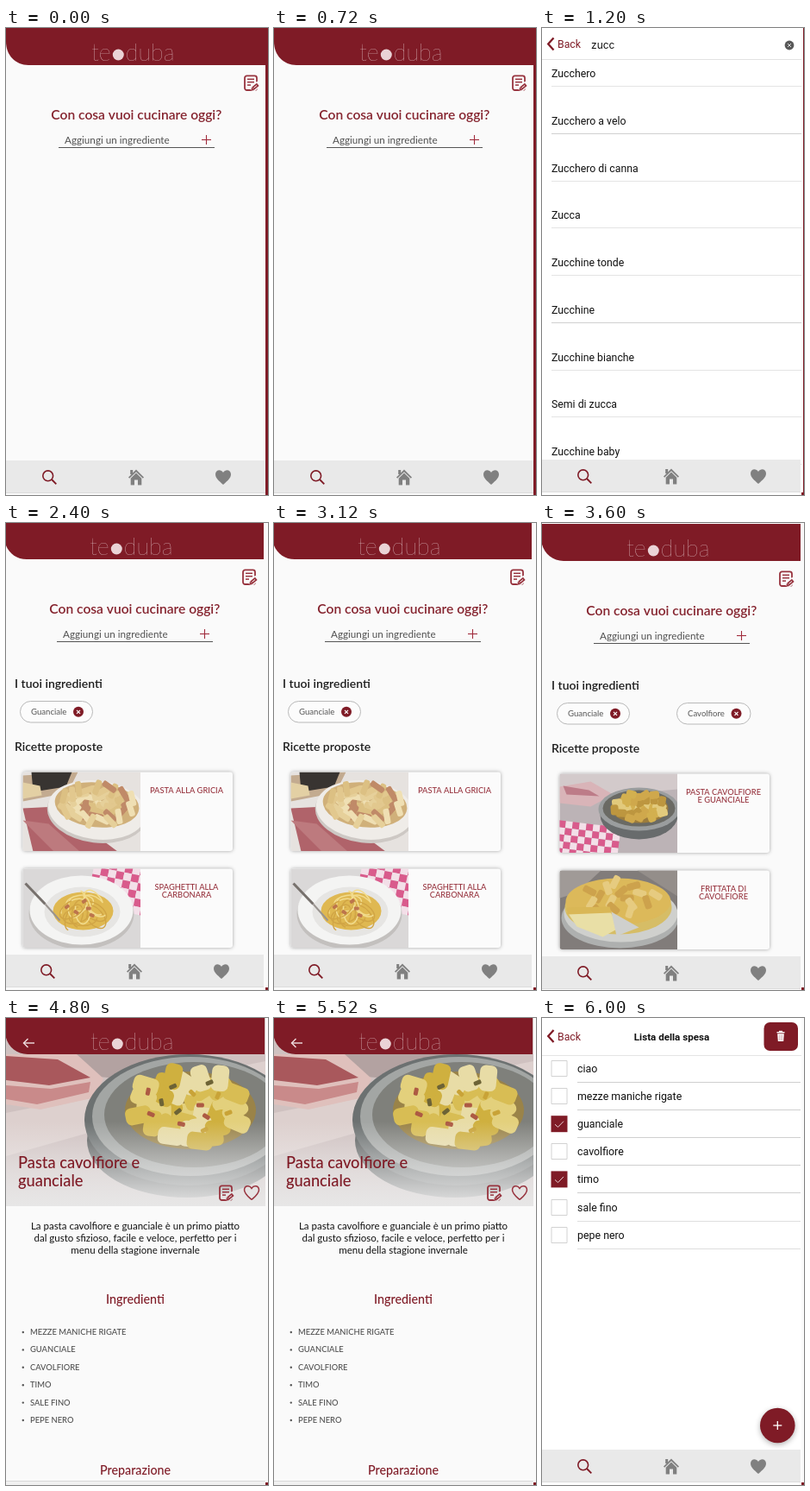
An HTML page with a canvas that plays this animation: 304x541 px, repeating every 7.2 s.

```html
<!DOCTYPE html>
<html lang="it">
<head>
<meta charset="utf-8">
<title>Ricettario</title>
<style>
html, body { margin: 0; width: 100%; height: 100%; overflow: hidden; background: #fafafa; }
canvas { display: block; width: 304px; height: 541px; }
</style>
</head>
<body>
<canvas id="stage"></canvas>
<script>
const W = 304, H = 541, HOLD = 1200;
const RED = '#7f1b26', SOFT_RED = '#98343f', PAGE = '#fafafa', GREY = '#808080', INK = '#1c1c1c';
const LATO = 'Lato, sans-serif', ROBOTO = 'Roboto, sans-serif';
const canvas = document.getElementById('stage');
const c = canvas.getContext('2d');
const scale = window.devicePixelRatio || 1;
canvas.width = Math.round(W * scale);
canvas.height = Math.round(H * scale);

function box(x, y, w, h, color) {
  c.fillStyle = color;
  c.fillRect(x, y, w, h);
}

function shape(color, build) {
  c.beginPath();
  build();
  c.fillStyle = color;
  c.fill();
}

function outline(color, width, build) {
  c.beginPath();
  build();
  c.strokeStyle = color;
  c.lineWidth = width;
  c.stroke();
}

function trace(...p) {
  c.moveTo(p[0], p[1]);
  for (let i = 2; i < p.length; i += 2) c.lineTo(p[i], p[i + 1]);
}

const line = (color, width, ...p) => outline(color, width, () => trace(...p));
const poly = (color, ...p) => shape(color, () => trace(...p));
const disc = (x, y, r, color) => shape(color, () => c.arc(x, y, r, 0, 7));
const oval = (x, y, rx, ry, color, turn = 0) =>
  shape(color, () => c.ellipse(x, y, rx, ry, turn, 0, 7));

function text(s, x, y, size, color, { face = LATO, weight = 400, align = 'left' } = {}) {
  c.font = `${weight} ${size}px ${face}`;
  c.fillStyle = color;
  c.textAlign = align;
  c.fillText(s, x, y);
}

function at(x, y, draw) {
  c.save();
  c.translate(x, y);
  draw();
  c.restore();
}

function cross(x, y, r, color, width) {
  line(color, width, x - r, y - r, x + r, y + r);
  line(color, width, x - r, y + r, x + r, y - r);
}

function plus(x, y, r, color, width) {
  line(color, width, x - r, y, x + r, y);
  line(color, width, x, y - r, x, y + r);
}

function heartPath(x, y, s = 1) {
  const curve = (...p) => c.bezierCurveTo(...p.map((v, i) => (i % 2 ? y : x) + v * s));
  c.moveTo(x, y + 8.5 * s);
  curve(-5, 4, -9, 1, -9, -3.5);
  curve(-9, -9, -2.5, -10, 0, -5.5);
  curve(2.5, -10, 9, -9, 9, -3.5);
  curve(9, 1, 5, 4, 0, 8.5);
}

function noteIcon(x, y, back) {
  at(x, y, () => {
    outline(SOFT_RED, 1.8, () => c.roundRect(1, 0.9, 14, 16.6, 2.5));
    [4.8, 8.2, 11.6].forEach((v, i) => line(SOFT_RED, 1.5, 4, v, i < 2 ? 12 : 8, v));
    line(back, 6.5, 9, 18, 17.5, 9.5);
    line(SOFT_RED, 4.2, 10.6, 15.6, 16.3, 10.9);
    poly(SOFT_RED, 8.3, 18.2, 8.9, 14.2, 12.4, 17.4);
    line(back, 1, 11.5, 14.8, 15, 12);
  });
}

function homeIcon(x, y) {
  poly(GREY, x - 9, y, x, y - 9, x + 9, y, x + 7.8, y + 1.3, x, y - 6.3, x - 7.8, y + 1.3);
  box(x - 6.8, y - 8.5, 3, 5, GREY);
  poly(GREY, x - 6.3, y + 1.3, x, y - 4.9, x + 6.3, y + 1.3, x + 6.3, y + 9,
    x + 2, y + 9, x + 2, y + 3, x - 2, y + 3, x - 2, y + 9, x - 6.3, y + 9);
}

function navBar(dx, dy) {
  at(dx, dy, () => {
    box(0, 501, 301, 37, '#e9e9e9');
    box(0, 538, 301, 1, '#dcdcdc');
    box(dx, 501, -dx, 37, '#e9e9e9');
    outline(RED, 1.6, () => c.arc(48.7, 518.8, 5.9, 0, 7));
    line(RED, 1.9, 53, 523, 58.3, 528.3);
    homeIcon(151, 520.5);
    shape(GREY, () => heartPath(252, 520.5));
  });
}

function edge(full) {
  if (full) return box(301, 0, 3, H, RED);
  box(301, 0, 3, H, '#fafafa');
  box(301, 538, 3, 3, RED);
}

function wordmark(x, y) {
  const tint = '#f6e9eb', style = { weight: 100 };
  text('te', x, y, 27, tint, style);
  const mid = x + c.measureText('te').width + 8.5;
  disc(mid, y - 7, 6.5, '#ead3d6');
  text('duba', mid + 8.5, y, 27, tint, style);
}

function header(dx, dy) {
  at(dx, dy, () => {
    shape(RED, () => {
      c.moveTo(0, Math.max(-dy, 0));
      c.lineTo(301, Math.max(-dy, 0));
      c.lineTo(301, 43);
      c.lineTo(26, 43);
      c.bezierCurveTo(11, 43, 0, 31.5, 0, 16);
    });
    wordmark(99, 38);
  });
}

// Seeded scatter of short tubes inside an ellipse
function pasta(x, y, rx, ry, count, len, thick, seed, colors) {
  const rnd = () => (seed = (seed * 16807) % 2147483647) / 2147483647;
  for (let i = 0; i < count; i++) {
    const a = i * 2.4, d = Math.sqrt((i + 0.5) / count);
    at(x + Math.cos(a) * rx * d, y + Math.sin(a) * ry * d, () => {
      c.rotate(rnd() * Math.PI);
      shape(colors[i % colors.length], () => c.roundRect(-len / 2, -thick / 2, len, thick, thick / 3));
    });
  }
}

function checks(x, y, cols, rows, size) {
  for (let i = 0; i < cols * rows; i++) {
    const u = i % cols, v = Math.floor(i / cols);
    box(x + u * size, y + v * size, size, size, (u + v) % 2 ? '#f3dfe8' : '#d95b8c');
  }
}

// Card pictures, drawn in a 137 by 92 area
const pictures = {
  gricia() {
    box(0, 0, 137, 92, '#e6e2df');
    poly('#c3ab90', 0, 4, 64, 0, 52, 24, 0, 34);
    poly('#383431', 10, 0, 57, 0, 50, 17, 12, 23);
    poly('#e3d0a4', 0, 12, 20, 16, 22, 27, 0, 31);
    poly('#b0636a', 0, 42, 40, 40, 110, 92, 12, 92);
    poly('#bd7a7e', 0, 56, 30, 60, 66, 92, 36, 92);
    oval(86, 47, 58, 35, '#cdc8c4', 0.12);
    oval(86, 44, 57, 34, '#efece8', 0.12);
    oval(86, 38, 49, 26, '#d0b07a', 0.1);
    pasta(86, 37, 43, 22, 48, 18, 7, 31, ['#e6d09a', '#dcc083', '#efdfb3', '#e2c88e', '#c08a68']);
  },
  carbonara() {
    box(0, 0, 137, 92, '#dad8d8');
    at(82, 0, () => { c.rotate(0.2); checks(0, -12, 8, 6, 9); });
    oval(68, 52, 61, 41, '#c3c0be');
    oval(68, 48, 60, 40, '#f4f4f3');
    oval(69, 50, 44, 29, '#e6e5e3');
    oval(70, 49, 35, 22, '#dfb851');
    for (let i = 0; i < 13; i++) {
      outline(i % 2 ? '#f2dc8e' : '#d1a545', 1.5, () =>
        c.ellipse(70 + Math.sin(i * 2) * 14, 48 + Math.cos(i * 3) * 9, 16, 9, i, 0, 5));
    }
    pasta(70, 46, 20, 12, 5, 6, 4, 9, ['#bd754c']);
    line('#77716d', 3, 3, 17, 26, 41);
    line('#9a9490', 2, 26, 41, 43, 60);
  },
  cauliflower() {
    box(0, 0, 137, 92, '#bcb3b6');
    poly('#d3cacb', 0, 0, 137, 0, 137, 18, 0, 30);
    poly('#d9b4b8', 0, 15, 36, 9, 62, 24, 36, 38, 0, 34);
    poly('#bd7c88', 4, 14, 34, 19, 46, 26, 8, 24);
    at(0, 66, () => { c.rotate(0.12); checks(-2, -12, 9, 6, 8); });
    oval(92, 48, 45, 28, '#686b6c');
    oval(92, 41, 47, 25, '#9a9d9e');
    oval(92, 40, 42, 21, '#6a6a64');
    oval(93, 40, 33, 17, '#9c7c3c');
    pasta(93, 38, 31, 16, 32, 12, 9, 17, ['#d3b04f', '#e2ca7c', '#bd963f', '#cfa84c']);
  },
  omelette() {
    box(0, 0, 137, 92, '#817c7a');
    poly('#a09a97', 0, 0, 48, 0, 20, 26, 0, 32);
    poly('#948e8a', 90, 0, 137, 0, 137, 30);
    oval(70, 55, 68, 35, '#aeb0af');
    oval(71, 50, 66, 33, '#cfd0cd');
    oval(68, 43, 62, 31, '#d6bd66');
    oval(68, 36, 61, 27, '#dcb95a');
    pasta(70, 32, 46, 19, 16, 16, 8, 5, ['#cda24c', '#e6cb80']);
    poly('#e9dfa6', 8, 47, 58, 47, 70, 66, 50, 77, 20, 65);
    poly('#d9b756', 8, 43, 58, 42, 60, 49, 9, 51);
    poly('#cfd0cd', 60, 48, 92, 66, 66, 76);
  }
};

function card(y, picture, lines) {
  c.save();
  c.shadowColor = 'rgba(0,0,0,.35)';
  c.shadowBlur = 4 * scale;
  shape('#fbfbfb', () => c.roundRect(21.5, y, 243.5, 91.5, 3));
  c.restore();
  c.save();
  c.beginPath();
  c.roundRect(21.5, y, 136.5, 91.5, [3, 0, 0, 3]);
  c.clip();
  c.translate(21.5, y);
  pictures[picture]();
  c.restore();
  lines.forEach((s, i) =>
    text(s, 211.5, y + 24.5 + i * 9, 9.3, SOFT_RED, { weight: 500, align: 'center' }));
}

function chip(x, w, label) {
  shape('#fcfcfc', () => c.roundRect(x, 207.5, w, 24.5, 12.2));
  outline('#b9b9b9', 1, () => c.roundRect(x, 207.5, w, 24.5, 12.2));
  text(label, x + 12.5, 223, 9.6, '#555');
  disc(x + w - 16.5, 219.8, 6, RED);
  cross(x + w - 16.5, 219.8, 2, '#fff', 1.2);
}

function searchPage(dx, dy, chips, cards) {
  box(0, 0, W, H, PAGE);
  header(dx, dy);
  at(dx, dy, () => {
    noteIcon(276, 54.5, PAGE);
    text('Con cosa vuoi cucinare oggi?', 151.3, 106, 15.6, '#85232e', { weight: 600, align: 'center' });
    text('Aggiungi un ingrediente', 68, 133.5, 11.7, '#505050');
    plus(232.5, 129.5, 5.5, '#a02c3c', 1.1);
    line('#555', 1, 61, 138.5, 242, 138.5);
    if (!chips) return;
    text('I tuoi ingredienti', 12, 192, 14, INK, { weight: 600 });
    text('Ricette proposte', 12, 265, 14, INK, { weight: 600 });
    chips.forEach(([x, w, label]) => chip(x, w, label));
    cards.forEach(([picture, ...lines], i) => card(289.5 + i * 112, picture, lines));
  });
  navBar(dx, dy);
  edge(!chips);
}

function backLink(y) {
  line(RED, 2.3, 13.5, y - 7, 7.2, y, 13.5, y + 7);
  text('Back', 18, y + 4.5, 12.3, RED, { face: ROBOTO });
}

function resultsPage() {
  box(0, 0, W, H, '#fff');
  backLink(18.5);
  text('zucc', 57, 24, 12, '#111', { face: 'Inter, sans-serif' });
  disc(287, 20, 5.4, '#595959');
  cross(287, 20, 2, '#ddd', 1);
  box(0, 36, 301, 1, '#e2e2e2');
  ['Zucchero', 'Zucchero a velo', 'Zucchero di canna', 'Zucca', 'Zucchine tonde', 'Zucchine',
    'Zucchine bianche', 'Semi di zucca', 'Zucchine baby'].forEach((s, i) => {
    text(s, 11, 57 + i * 54.75, 12.3, '#111', { face: ROBOTO });
    box(11, Math.floor(67.5 + i * 54.75), 290, 1, i % 4 === 1 ? '#d0d0d0' : '#e4e4e4');
  });
  navBar(-1, -1);
  edge(false);
  box(303, 0, 1, H, RED);
}

function heroPicture() {
  c.save();
  c.beginPath();
  c.rect(0, 0, 301, 218);
  c.clip();
  box(0, 0, 301, 218, '#cfc1c0');
  poly('#ddd0ce', 0, 110, 301, 50, 301, 75, 0, 160);
  poly('#b3a2a1', 70, 42, 200, 42, 130, 70, 84, 66);
  poly('#dfc0bc', 0, 42, 82, 42, 113, 70, 104, 92, 40, 106, 0, 100);
  poly('#a9585c', 0, 44, 60, 48, 98, 69, 50, 78, 0, 72);
  poly('#c98a8a', 0, 78, 52, 82, 98, 74, 96, 86, 36, 100, 0, 94);
  oval(210, 142, 116, 66, '#565a5a');
  oval(212, 118, 121, 76, '#6c7171');
  oval(214, 114, 114, 69, '#a3a6a4');
  oval(218, 112, 104, 61, '#7f807b');
  oval(214, 107, 76, 45, '#9a8348');
  pasta(214, 103, 66, 41, 34, 30, 20, 23, ['#cfb03f', '#e3d07c', '#d8bd54', '#e8dca6']);
  pasta(214, 101, 58, 32, 13, 9, 5, 44, ['#ad5a43', '#6d6336', '#c9a337']);
  const fade = c.createLinearGradient(0, 120, 0, 218);
  fade.addColorStop(0, 'rgba(240,240,240,0)');
  fade.addColorStop(0.5, 'rgba(240,240,240,.5)');
  fade.addColorStop(1, 'rgba(232,232,232,.96)');
  box(0, 120, 301, 98, fade);
  c.restore();
}

function recipePage() {
  const mid = { align: 'center' }, head = { align: 'center', weight: 500 };
  box(0, 0, W, H, PAGE);
  heroPicture();
  header(-1, -1);
  line('#f0dfe1', 1.4, 33, 29, 20.5, 29);
  line('#f0dfe1', 1.4, 25.5, 24, 20.5, 29, 25.5, 34);
  text('Pasta cavolfiore e', 14, 173.5, 18.3, RED, { weight: 500 });
  text('guanciale', 14, 194.5, 18.3, RED, { weight: 500 });
  noteIcon(247, 193.5, '#e6e6e6');
  outline(SOFT_RED, 1.5, () => heartPath(285, 202.5, 0.94));
  ['La pasta cavolfiore e guanciale è un primo piatto',
    'dal gusto sfizioso, facile e veloce, perfetto per i',
    'menu della stagione invernale'].forEach((s, i) => text(s, 150, 245 + i * 14, 11.5, '#111', mid));
  text('Ingredienti', 150, 330.5, 14.3, RED, head);
  ['MEZZE MANICHE RIGATE', 'GUANCIALE', 'CAVOLFIORE', 'TIMO', 'SALE FINO', 'PEPE NERO'].forEach((s, i) => {
    const y = 367 + i * 20.4;
    disc(19.8, y - 3, 1.2, '#555');
    text(s, 28, y, 9.4, '#505050', { weight: 500 });
  });
  text('Preparazione', 150, 528.5, 14.3, RED, head);
  box(0, 536, 301, 1, '#d8d8d8');
  box(0, 537, 301, 4, '#f1f1f1');
  edge(false);
}

function listPage() {
  box(0, 0, W, H, '#fff');
  backLink(21);
  text('Lista della spesa', 150.5, 25.5, 11.6, '#111', { face: ROBOTO, weight: 700, align: 'center' });
  shape(RED, () => c.roundRect(257.5, 5, 39.5, 33, 7));
  box(272.5, 16, 9, 1.4, '#fff');
  box(275, 14.8, 4, 1.4, '#fff');
  poly('#fff', 273.2, 18.2, 280.8, 18.2, 280.2, 27, 273.8, 27);
  [275.4, 277, 278.6].forEach(x => line('#b9777e', 0.5, x, 19.5, x, 26));
  box(0, 43, 301, 1, '#e4e4e4');
  ['ciao', 'mezze maniche rigate', 'guanciale', 'cavolfiore', 'timo', 'sale fino', 'pepe nero'].forEach((s, i) => {
    const y = 49 + i * 32.1, done = i === 2 || i === 4;
    shape(done ? RED : '#fff', () => c.rect(10.5, y, 19, 19));
    if (done) line('#e6cdd0', 1, 15, y + 10, 18.5, y + 13.2, 25, y + 6.5);
    else outline('#d2d2d2', 1, () => c.rect(11, Math.round(y) + 0.5, 18, 18));
    text(s, 41, y + 14, 12.4, '#111', { face: ROBOTO });
    box(41, Math.round(y + 25), 259, 1, i < 5 ? '#cfcfcf' : '#dedede');
  });
  c.save();
  c.shadowColor = 'rgba(0,0,0,.3)';
  c.shadowBlur = 6 * scale;
  c.shadowOffsetY = 2 * scale;
  disc(273.3, 472, 20.3, RED);
  c.restore();
  plus(273.3, 472, 5, '#fff', 1.3);
  navBar(-1, -1);
  edge(false);
}

const guanciale = [18.5, 84, 'Guanciale'];
const cavolfiore = [157.5, 85.5, 'Cavolfiore'];
const screens = [
  () => searchPage(0, 0),
  resultsPage,
  () => searchPage(-2, -1, [guanciale], [
    ['gricia', 'PASTA ALLA GRICIA'],
    ['carbonara', 'SPAGHETTI ALLA', 'CARBONARA']
  ]),
  () => searchPage(-1, 1, [guanciale, cavolfiore], [
    ['cauliflower', 'PASTA CAVOLFIORE', 'E GUANCIALE'],
    ['omelette', 'FRITTATA DI', 'CAVOLFIORE']
  ]),
  recipePage,
  listPage
];

const start = performance.now();
function tick() {
  const t = Math.max(0, performance.now() - start);
  c.setTransform(scale, 0, 0, scale, 0, 0);
  screens[Math.floor(t / HOLD) % screens.length]();
  requestAnimationFrame(tick);
}
tick();
</script>
</body>
</html>
```
